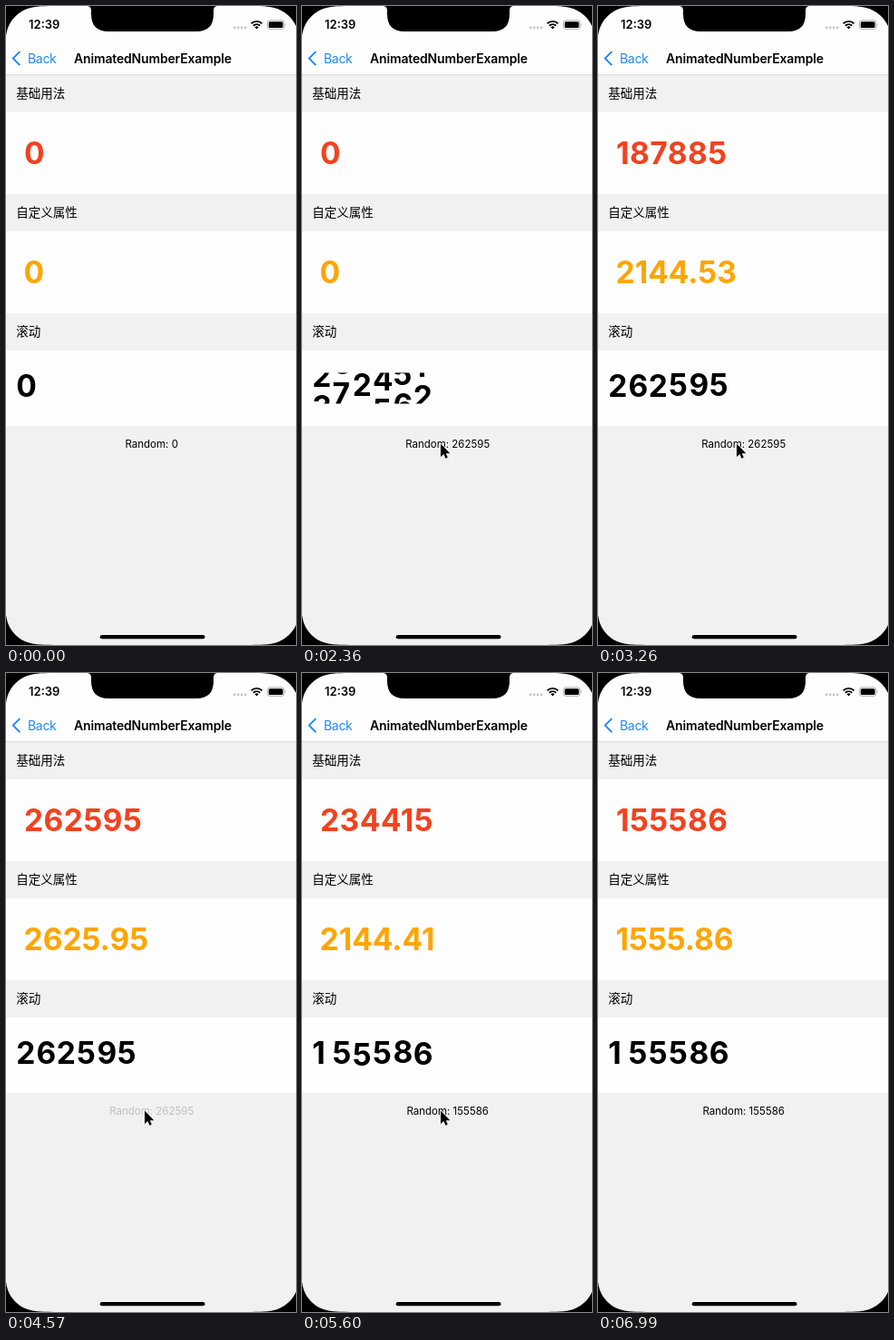
These frames come from a looping animation (320x703 px, 7.4 s). An HTML page:

```html
<!DOCTYPE html>
<html lang="zh">
<head>
<meta charset="utf-8">
<title>Animated numbers</title>
<style>
  html, body { margin: 0; width: 100%; height: 100%; overflow: hidden; background: #f1f1f1; }
  svg { display: block; width: 320px; height: 703px; font-family: Inter, "Open Sans", sans-serif; }
  .label { font: 13.5px "Noto Sans CJK SC", "Noto Sans CJK", sans-serif; }
  .big { font-size: 33.5px; font-weight: 700; }
  #basic { letter-spacing: .5px; }
  .title { font-size: 14px; font-weight: 600; letter-spacing: -.16px; }
  .back { font-size: 14px; letter-spacing: -.3px; fill: #2089f5; }
  .clock { font-size: 13px; font-weight: 600; }
  .random { font-size: 11.5px; text-anchor: middle; }
  #cursor { filter: drop-shadow(0 .8px .6px rgba(0, 0, 0, .3)); }
</style>
</head>
<body>
<svg viewBox="0 0 320 703">
  <defs>
    <clipPath id="window"><rect x="0" y="403.5" width="320" height="34"/></clipPath>
    <path id="corner" d="M-2 0H59.6C42.5 0 33.9 0 24.6 2.9C14.5 6.6 6.6 14.5 2.9 24.6C0 33.9 0 42.5 0 59.6H-2Z"/>
  </defs>

  <rect width="320" height="703" fill="#f1f1f1"/>
  <g fill="#fefefe">
    <rect width="320" height="75.5"/>
    <rect y="117" width="320" height="90"/>
    <rect y="248" width="320" height="90"/>
    <rect y="379" width="320" height="83"/>
  </g>
  <rect y="75.3" width="320" height=".8" fill="#d8d8d8"/>

  <text class="clock" x="25.1" y="25">12:39</text>
  <g fill="#c4c4c4">
    <circle cx="252.2" cy="23.8" r="1.4"/><circle cx="256.2" cy="23.8" r="1.4"/>
    <circle cx="260.2" cy="23.8" r="1.4"/><circle cx="264.2" cy="23.8" r="1.4"/>
  </g>
  <g fill="none" stroke="#000" stroke-width="1.9">
    <path d="M270.7 19.3A8.4 8.4 0 0 1 282.5 19.3"/>
    <path d="M272.9 21.7A5.3 5.3 0 0 1 280.3 21.7"/>
  </g>
  <path d="M276.6 25.4L274.5 23.3A3 3 0 0 1 278.7 23.3Z"/>
  <rect x="288.4" y="15.9" width="18.6" height="9.4" rx="2.8" fill="none" stroke="#a2a2a2" stroke-width=".9"/>
  <rect x="289.8" y="17.3" width="15.8" height="6.6" rx="1.5"/>
  <path d="M308 19.2Q309.3 20.6 308 22Z" fill="#a2a2a2"/>

  <path d="M14.8 50.6L7.8 57.6L14.8 64.6" fill="none" stroke="#2089f5" stroke-width="2" stroke-linecap="round" stroke-linejoin="round"/>
  <text class="back" x="24" y="62.6">Back</text>
  <text class="title" x="75" y="62.6">AnimatedNumberExample</text>

  <text class="label" x="11.2" y="100.5">基础用法</text>
  <text class="label" x="11.2" y="231.5">自定义属性</text>
  <text class="label" x="11.2" y="362.5">滚动</text>

  <text class="big" id="basic" x="20" y="174.3" fill="#f2421f">0</text>
  <text class="big" id="custom" x="19.6" y="305.3" fill="#ffa500">0</text>
  <g class="big" id="roll" clip-path="url(#window)"></g>
  <text class="random" id="random" x="160.7" y="486">Random: 0</text>

  <rect x="103.7" y="692.1" width="115.8" height="4.2" rx="2.1"/>
  <use href="#corner" transform="translate(-1)"/>
  <use href="#corner" transform="translate(324) scale(-1 1)"/>
  <use href="#corner" transform="translate(-1 703) scale(1 -1)"/>
  <use href="#corner" transform="translate(324 703) scale(-1 -1)"/>
  <path d="M89 0Q94 0 94 5V9Q94 28 113 28H210Q229 28 229 9V5Q229 0 234 0Z"/>

  <path id="cursor" d="M1 1.5V16L4.4 13.1L6.5 17.8L8.8 16.8L6.8 12.2H11.3Z" stroke="#fff" stroke-width="1.6" stroke-linejoin="round" paint-order="stroke"/>
</svg>

<script>
const LOOP = 7400;
const SPAN = 933.3;      // one second of the recorded app, in ms
const ROW = 34, COLUMN = 22.3, BASELINE = 430;
const $ = id => document.getElementById(id);

// tap: release of the button; count: start of the two counters
const runs = [
  { tap: 2055, count: 2510, from: 0, to: 262595 },
  { tap: 4775, count: 5192, from: 262595, to: 155586 }
];

const linear = x => x;
const inOut = x => x < .5 ? 2 * x * x : 1 - 2 * (1 - x) ** 2;
const out = x => 1 - (1 - x) ** 2.2;

// cubic-bezier(.42, 0, 1, 1)
function easeIn(x) {
  let lo = 0, hi = 1;
  for (let i = 0; i < 30; i++) {
    const s = (lo + hi) / 2, q = 1 - s;
    if (1.26 * s * q * q + 3 * s * s * q + s ** 3 < x) lo = s; else hi = s;
  }
  return 3 * lo * lo - 2 * lo ** 3;
}

// damping 10, stiffness 100, mass 1
function spring(sec) {
  if (sec <= 0) return 0;
  if (sec > 1.8) return 1;
  const w = Math.sqrt(75);
  return 1 - Math.exp(-5 * sec) * (Math.cos(w * sec) + 5 / w * Math.sin(w * sec));
}

// steps: [time, values, easing towards this step]
function sample(steps, t) {
  const i = steps.findIndex(s => s[0] > t);
  if (i < 0) return steps[steps.length - 1][1];
  if (i === 0) return steps[0][1];
  const [t0, a] = steps[i - 1], [t1, b, ease = linear] = steps[i];
  const k = ease((t - t0) / (t1 - t0));
  return a.map((v, n) => v + (b[n] - v) * k);
}

const fade = [
  [1600, [1]], [1730, [.2], inOut], [2055, [.2]], [2290, [1], inOut],
  [4569.9, [1]], [4570, [.2]], [4775, [.2]], [5010, [1], inOut]
];
const path = [
  [470, [324, 677]], [865, [157, 514], out], [1115, [157, 514]],
  [1320, [152, 480], inOut], [5880, [152, 480]], [6280, [271, 600], inOut],
  [6292, [271, 600]], [6390, [284, 627], out], [6580, [284, 627]], [6990, [323, 703], inOut]
];

const columns = Array.from({ length: 6 }, (_, i) => {
  const g = document.createElementNS("http://www.w3.org/2000/svg", "g");
  for (let d = 0; d < 10; d++) {
    const text = document.createElementNS(g.namespaceURI, "text");
    text.setAttribute("x", 11.2 + COLUMN * i);
    text.setAttribute("y", BASELINE + ROW * d);
    text.textContent = d;
    g.append(text);
  }
  $("roll").append(g);
  return g;
});

// counters advance thirty times per second
function progress(t, start) {
  const x = (t - start) / SPAN;
  return x < 0 ? 0 : x >= 1 ? 1 : (2 * Math.floor(x * 30) + 1) / 60;
}

function draw(t) {
  const tapped = runs.filter(r => t >= r.tap).pop();
  const run = tapped || runs[0];
  const p = progress(t, run.count), change = run.to - run.from;
  const cents = (run.from + change * p) / 100;

  $("basic").textContent = Math.round(run.from + change * easeIn(p));
  $("custom").textContent = cents ? cents.toFixed(2) : "0";
  $("random").textContent = "Random: " + (tapped ? run.to : 0);
  $("random").setAttribute("opacity", sample(fade, t)[0]);

  // each column starts a little after its left neighbour
  const digits = n => String(n).padStart(6, "0");
  columns.forEach((g, i) => {
    const a = +digits(run.from)[i], b = +digits(run.to)[i];
    const k = tapped ? spring((t - run.tap) / SPAN + .02 - i * .05) : 0;
    g.setAttribute("transform", `translate(0 ${-ROW * (a + (b - a) * k)})`);
    g.style.display = tapped || i === 0 ? "" : "none";
  });

  const [x, y] = sample(path, t);
  $("cursor").setAttribute("transform", `translate(${x} ${y})`);
  $("cursor").style.display = t >= 480 && t < 6990 ? "" : "none";
}

function frame() {
  draw(performance.now() % LOOP);
  requestAnimationFrame(frame);
}
frame();
</script>
</body>
</html>
```
